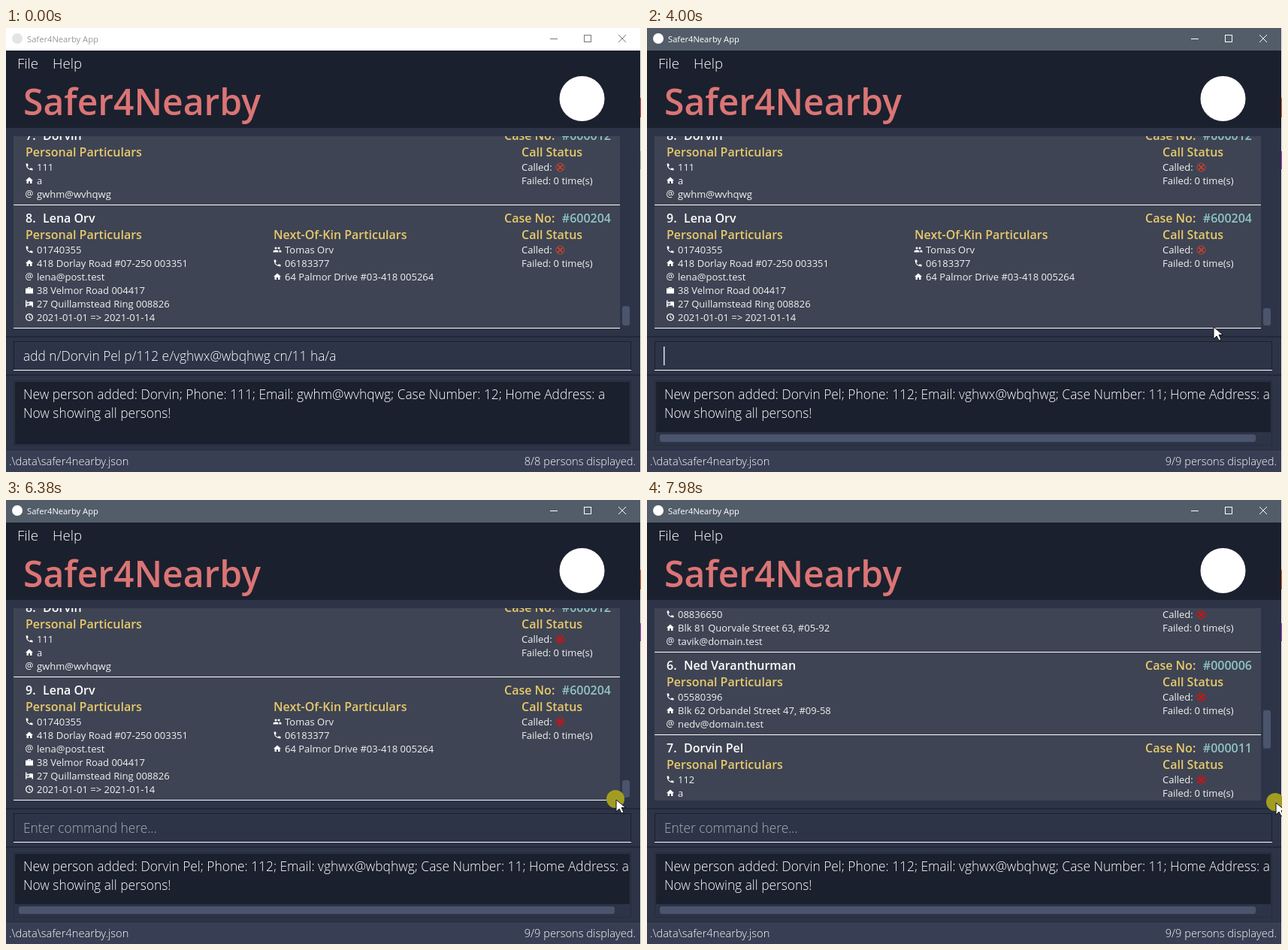
Recreate the animation shown at these times as an HTML page with a canvas. Size 845 by 591 pixels, loop 8 s.

```html
<!DOCTYPE html>
<html lang="en">
<head>
<meta charset="utf-8">
<title>Safer4Nearby App</title>
<style>
  html, body { margin: 0; width: 845px; height: 591px; overflow: hidden; background: #2d3447; }
  canvas { display: block; }
</style>
</head>
<body>
<canvas id="stage" width="845" height="591"></canvas>
<script>
const ctx = document.getElementById('stage').getContext('2d');
const LOOP = 8000;
const WIDTH = 844;
const VIEW = { top: 144, height: 256 };
const INK = '#1b202e', PANEL = '#2d3447', THUMB = '#4a546c', YELLOW = '#e8c96c', TEAL = '#8fc5c2';

// Icons on a 24-unit grid
const icons = {
  p: 'M4 3h4l1.5 5.5-3 2.5q2 4 6.5 6.5l2.5-3L21 16v4q0 1-1 1Q4 20 3 4z',
  h: 'M10 20v-6h4v6h5v-8h3L12 3 2 12h3v8z',
  w: 'M2 7h6V4h8v3h6v14H2zM10 6v1h4V6z',
  q: 'M2 3h3v11h7V6h7q3 0 3 3v12h-3v-4H5v4H2zM8.500 6.500a2.800 2.800 0 1 0 .01 0z',
  t: 'M12 2a10 10 0 1 0 .01 0zM12 4.500a7.500 7.500 0 1 1-.01 0zM11 7h2v5l4 2-1 2-5-3z',
  k: 'M8 5a3 3 0 1 0 .01 0zM16 5a3 3 0 1 0 .01 0zM1 19v-2q0-4 7-4 7 0 7 4v2zM17 13q6 0 6 4v2h-6z'
};
for (const key in icons) icons[key] = new Path2D(icons[key]);
const arrow = new Path2D('M1 1v16l4-4 3 6 3-1.500-3-6h5.500z');

// [name, case number, particulars, next of kin]; the first letter of a row picks its icon
const people = [
  ['Alun Vorr', '000001', ['p01438807', 'hBlk 17 Wendle Street 29, #06-40', 'ealunv@domain.test',
    'wBlk 33 Morrow Street 18, #02-15', 'qBlk 17 Wendle Street 29, #06-40', 't2021-09-28 => 2021-10-04'],
    ['kSelma Vorr', 'p06172294', 'hBlk 17 Wendle Street 29, #06-40']],
  ['Felicia Mor', '000002', ['p09572283', 'hBlk 24 Fallen Street 61, #07-18', 'efeliciamor@domain.test',
    't2021-10-02 => 2021-10-07'], ['kGideon Mor', 'p04415870']],
  ['Annabelle Torvessi', '000003', ['p03471508', 'hBlk 38 Ulm Fa Ren Street 52, #08-17',
    'eannabelle@domain.test', "qVLT Baron Wendell's Yard Residences", 't2021-09-29 => 2021-10-05'],
    ['kBartholomew Torvessi', 'p07751846', 'hBlk 59 Ulm Fa Ren Street 52, #03-41']],
  ['Corin Ve', '000004', ['p06645017', 'hBlk 715 Tallowmere Gardens Street 38, #04-29',
    'ecorinve@domain.test', 't2021-09-20 => 2021-09-27'], ['p02217094']],
  ['Tavik Emerand', '000005', ['p08836650', 'hBlk 81 Quorvale Street 63, #05-92', 'etavik@domain.test']],
  ['Ned Varanthurman', '000006', ['p05580396', 'hBlk 62 Orbandel Street 47, #09-58', 'enedv@domain.test']],
  ['Dorvin Pel', '000011', ['p112', 'ha', 'evghwx@wbqhwg']],
  ['Dorvin', '000012', ['p111', 'ha', 'egwhm@wvhqwg']],
  ['Lena Orv', '600204', ['p01740355', 'h418 Dorlay Road #07-250 003351', 'elena@post.test',
    'w38 Velmor Road 004417', 'q27 Quillamstead Ring 008826', 't2021-01-01 => 2021-01-14'],
    ['kTomas Orv', 'p06183377', 'h64 Palmor Drive #03-418 005264']]
];
const before = people.filter(p => p[1] !== '000011');

const command = 'add n/Dorvin Pel p/112 e/vghwx@wbqhwg cn/11 ha/a';
const added = (name, phone, mail, no) =>
  `New person added: ${name}; Phone: ${phone}; Email: ${mail}; Case Number: ${no}; Home Address: a`;

// Time, x, y of the pointer
const mouseKeys = [
  [70, 850, 580], [560, 609, 436], [3340, 609, 436], [3650, 824, 229], [3958, 753, 397],
  [4140, 790, 392], [4230, 829, 386], [4550, 829, 386], [5000, 829, 190], [5290, 829, 160],
  [5420, 830, 185], [5545, 830, 244], [5900, 818, 410], [6165, 809, 450], [6300, 809, 450],
  [6373, 811, 398], [6750, 818, 330], [6994, 825, 183], [7060, 826, 155], [7270, 826, 155],
  [7600, 829, 185], [7960, 836, 402]
];
// Time, scroll position from 0 to 1
const scrollKeys = [
  [4550, 1], [5000, 0.3], [5290, 0], [5420, 0.08], [5545, 0.2486], [5900, 0.7], [6165, 1],
  [6700, 1], [6994, 0.8774], [7060, 0.6], [7270, 0.6], [7500, 0.15], [7720, 0.2], [7960, 0.669]
];

function at(keys, t) {
  const next = keys.findIndex(k => k[0] > t);
  if (next === 0) return keys[0].slice(1);
  if (next < 0) return keys[keys.length - 1].slice(1);
  const a = keys[next - 1], b = keys[next], f = (t - a[0]) / (b[0] - a[0]);
  return a.slice(1).map((v, i) => v + (b[i + 1] - v) * f);
}

const stepped = t => 5545 + Math.floor((t - 5545) / 69) * 69;

const within = (t, a, b) => t >= a && t < b;

function rect(x, y, w, h, color, radius = 0) {
  ctx.fillStyle = color;
  ctx.beginPath();
  ctx.roundRect(x, y, w, h, radius);
  ctx.fill();
}

function disc(x, y, r, color) {
  ctx.fillStyle = color;
  ctx.beginPath();
  ctx.arc(x, y, r, 0, 7);
  ctx.fill();
}

function text(str, x, y, size, weight, color = '#fff', align = 'left') {
  ctx.font = `${weight} ${size}px "Open Sans", sans-serif`;
  ctx.textAlign = align;
  ctx.fillStyle = color;
  ctx.fillText(str, x, y);
}

function lines(color, width, ...paths) {
  ctx.strokeStyle = color;
  ctx.lineWidth = width;
  ctx.beginPath();
  for (const [x1, y1, x2, y2] of paths) { ctx.moveTo(x1, y1); ctx.lineTo(x2, y2); }
  ctx.stroke();
}

function clipped(x, y, w, h, draw) {
  ctx.save();
  ctx.beginPath();
  ctx.rect(x, y, w, h);
  ctx.clip();
  draw();
  ctx.restore();
}

function drawHeader(active) {
  const ink = active ? '#fff' : '#777';
  rect(0, 0, WIDTH, 30, active ? '#525d69' : '#fff');
  disc(15, 14, 7, active ? '#fff' : '#e4e4e4');
  text('Safer4Nearby App', 28, 19, 11.2, 400, active ? '#fff' : '#999');
  lines(ink, 1, [724, 14.5, 734, 14.5], [815, 9, 825, 19], [825, 9, 815, 19]);
  ctx.strokeRect(769.5, 9.5, 9, 9);

  rect(0, 30, WIDTH, 103, INK);
  text('File', 15, 54, 18.67, 300);
  text('Help', 62, 54, 18.67, 300);
  text('Safer4Nearby', 23, 116, 48, 600, '#db7575');
  disc(766.5, 94, 30, '#fff');
}

function drawRows(rows, x, top) {
  rows.forEach((row, i) => {
    const y = top + 64 + 18 * i;
    if (row[0] === 'e') {
      text('@', x - 0.5, y - 1, 12, 400);
    } else {
      ctx.save();
      ctx.translate(x - 1, y - 11);
      ctx.scale(0.5, 0.5);
      ctx.fillStyle = '#fff';
      ctx.fill(icons[row[0]], 'evenodd');
      ctx.restore();
    }
    text(row.slice(1), x + 15, y, 13, 400, '#f2f2f2');
  });
}

function drawCard([name, no, rows, kin], number, top, height, cross) {
  rect(10, top, 807, height, '#3e4453');
  rect(10, top + height - 1, 807, 1, '#fff');
  text(number + '.', 26, top + 23, 16, 600);
  text(name, 49, top + 23, 16, 600);
  text('Case No:', 663, top + 23, 16, 600, YELLOW);
  text('#' + no, 805, top + 23, 16, 600, TEAL, 'right');
  text('Personal Particulars', 26, top + 45, 16, 600, YELLOW);
  drawRows(rows, 26, top);
  if (kin) {
    text('Next-Of-Kin Particulars', 356, top + 45, 16, 600, YELLOW);
    drawRows(kin, 356, top);
  }
  text('Call Status', 686, top + 45, 16, 600, YELLOW);
  text('Called:', 686, top + 64, 13, 400, '#f2f2f2');
  text('Failed: 0 time(s)', 686, top + 82, 13, 400, '#f2f2f2');
  const y = top + 59.5;
  lines(cross, 1.7, [734, y - 3.5, 741, y + 3.5], [741, y - 3.5, 734, y + 3.5]);
  ctx.lineWidth = 1;
  ctx.beginPath();
  ctx.arc(737.5, y, 5.5, 0, 7);
  ctx.stroke();
}

function drawList(list, pos, cross) {
  const n = list.length;
  const height = i => 56 + 18 * list[i][2].length;
  // The card under the scroll position is placed first, its neighbours follow from it
  let i = Math.min(Math.floor(pos * n), n - 1);
  let y = Math.round(VIEW.top + pos * VIEW.height - (pos * n - i) * height(i));
  while (i > 0 && y > VIEW.top) y -= height(--i);
  clipped(10, VIEW.top, 807, VIEW.height, () => {
    for (; i < n && y < VIEW.top + VIEW.height; y += height(i++)) {
      drawCard(list[i], i + 1, y, height(i), cross);
    }
  });
  const thumb = within(pos, 0.55, 0.97) ? 51 : 207 / n;
  rect(820, 148 + pos * (248 - thumb), 10, thumb, THUMB, 3);
}

function drawCommand(t) {
  rect(0, 410, WIDTH, 2, '#222839');
  ctx.strokeStyle = INK;
  ctx.lineWidth = 1;
  ctx.strokeRect(10.5, 417.5, 821, 38);
  rect(10, 455, 822, 1, '#fff');
  const typed = t < 2520 ? command : '';
  text(typed, 23, 443, 17.33, 300);
  const caretX = 22 + ctx.measureText(typed).width;
  if (t >= 4550) text('Enter command here...', 23, 443, 17.33, 300, '#a3b2b5');
  if (within(t, 650, 1150) || within(t, 2660, 3170) || within(t, 3650, 4210)) {
    rect(caretX, 424, 1.5, 25, '#dfe2e6');
  }
}

function drawResult(t) {
  const isNew = t >= 2520, corner = within(t, 2520, 2590);
  const right = corner ? 814 : 830;
  rect(0, 461, WIDTH, 2, '#222839');
  ctx.strokeStyle = '#252b3b';
  ctx.lineWidth = 1;
  ctx.strokeRect(10.5, 469.5, 821, 86);
  rect(12, 471, right - 12, isNew ? 67 : 83, INK);
  clipped(12, 471, right - 12, 83, () => {
    text(isNew ? added('Dorvin Pel', 112, 'vghwx@wbqhwg', 11) : added('Dorvin', 111, 'gwhm@wvhqwg', 12),
      23, 494, 17.33, 300);
    text('Now showing all persons!', 23, 519, 17.33, 300);
  });
  if (isNew) rect(17, 541, corner ? 762 : 793, 10, THUMB, 3);
  if (corner) {
    rect(817, 475, 10, 46, THUMB, 3);
    rect(814, 538, 15, 15, '#ecebe6');
  }
}

function drawStatus(count) {
  rect(0, 561, WIDTH, 30, '#383f54');
  rect(0, 561, WIDTH, 1, '#262c3c');
  text('.\\data\\safer4nearby.json', 4, 582, 14.67, 300);
  text(`${count}/${count} persons displayed.`, 838, 582, 14.67, 300, '#fff', 'right');
}

function drawMouse(t) {
  if (t < 70) return;
  const [x, y] = at(mouseKeys, stepped(t));
  if (within(t, 580, 820) || t >= 4550) disc(x, y, 12, '#a29d22');
  if (t < 4000 && within(x, 10, 832) && (within(y, 417, 456) || within(y, 470, 555))) {
    const bars = [[x - 3, y - 7.5, x + 4, y - 7.5], [x + 0.5, y - 7, x + 0.5, y + 7], [x - 3, y + 7.5, x + 4, y + 7.5]];
    lines('#d5d8dc', 1, ...bars);
    return;
  }
  ctx.save();
  ctx.translate(x, y);
  ctx.fillStyle = '#fff';
  ctx.strokeStyle = '#111';
  ctx.lineWidth = 1;
  ctx.fill(arrow);
  ctx.stroke(arrow);
  ctx.restore();
}

function draw(t) {
  const active = t >= 580;
  const list = t < 2520 ? before : people;
  rect(0, 0, 845, 591, PANEL);
  rect(WIDTH, 0, 1, 591, '#f4f4f4');
  rect(WIDTH, 93, 1, 26, active ? '#e8743c' : '#e05050');
  rect(WIDTH, 164, 1, 24, active ? '#b04ad0' : '#c8c8c8');
  drawHeader(active);
  drawList(list, at(scrollKeys, stepped(t))[0], t < 4550 ? '#d5402a' : '#f00808');
  drawCommand(t);
  drawResult(t);
  drawStatus(list.length);
  drawMouse(t);
}

const start = performance.now();
function tick() {
  draw((performance.now() - start) % LOOP);
  requestAnimationFrame(tick);
}
tick();
</script>
</body>
</html>
```
